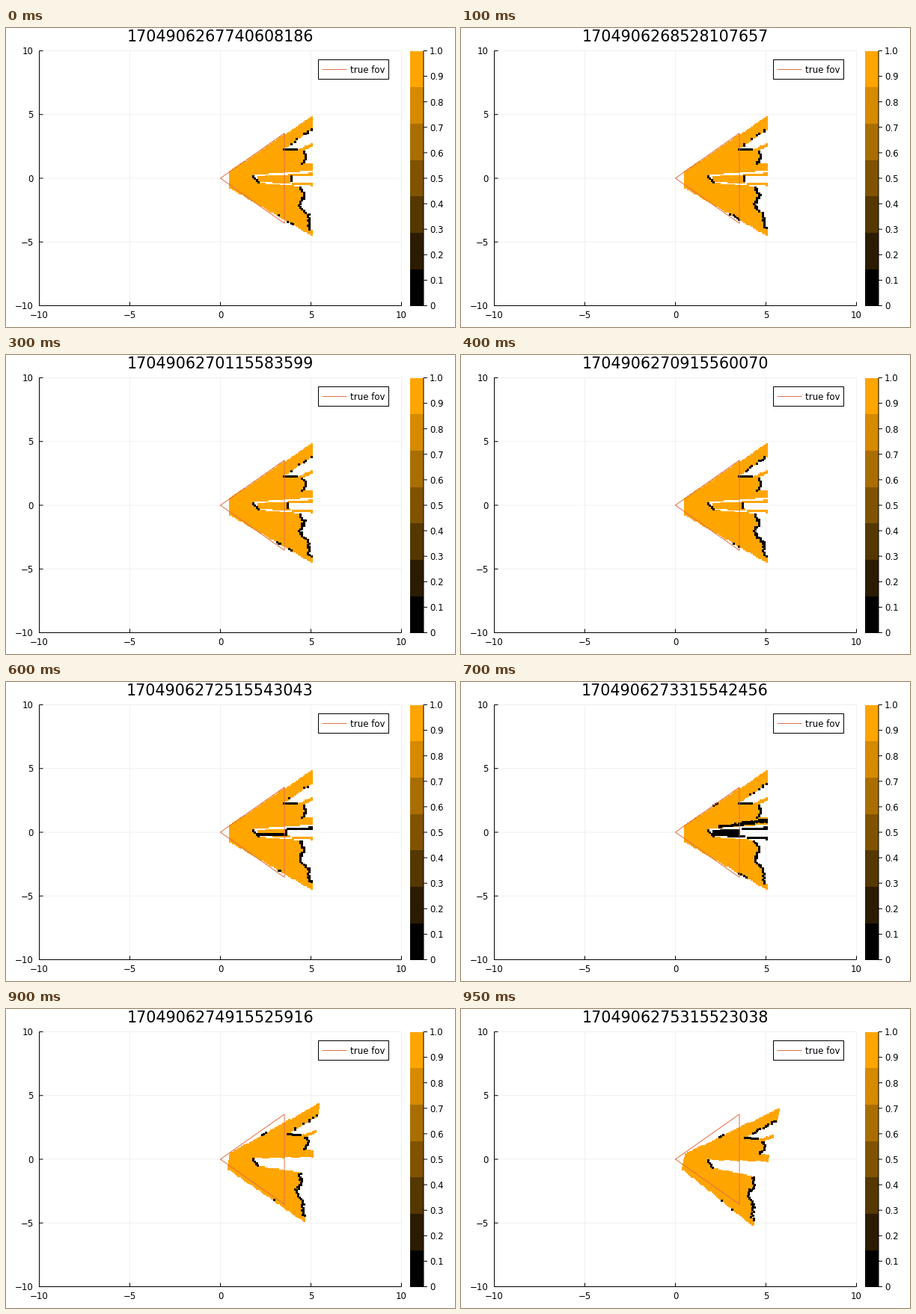
A matplotlib script that plays this animation: 600 px wide and 400 px high, repeating every 1 s.

```python
import numpy as np
import matplotlib.pyplot as plt
from matplotlib.animation import FuncAnimation
from matplotlib.patches import Rectangle

W, H, DPI = 600, 400, 100
FRAMES, INTERVAL = 20, 50
ORANGE, BLACK, FOV, GRID = "#ffa500", "#000000", "#e26f46", "#f0f0f0"
LEFT, RIGHT, TOP, BOTTOM = 44.5, 528.5, 30.5, 371.5
PT = 72 / DPI
CELL = 0.1

# Clock readings (ns) at key steps; the rest are interpolated
STAMPS = {
    0: 1704906267740608186, 4: 1704906269315607128,
    8: 1704906270915560070, 12: 1704906272515543043,
    14: 1704906273315542456, 16: 1704906274115531672,
    19: 1704906275315523038,
}

plt.rcParams["font.family"] = "DejaVu Sans"
fig = plt.figure(figsize=(W / DPI, H / DPI), dpi=DPI, facecolor="white")
ax = fig.add_axes([0, 0, 1, 1])
ax.set(xlim=(0, W), ylim=(H, 0))
ax.axis("off")


def px(x, y):
    return (LEFT + (x + 10) * (RIGHT - LEFT) / 20,
            BOTTOM - (y + 10) * (BOTTOM - TOP) / 20)


def line(xs, ys, color=BLACK, z=3):
    ax.plot(xs, ys, color=color, lw=PT, zorder=z, snap=False,
            solid_capstyle="butt", solid_joinstyle="miter")


def label(x, y, text, ha="center", size=8.45):
    return ax.text(x, y, text, ha=ha, va="center_baseline", fontsize=size,
                   zorder=6)


def draw_axes():
    for v in range(-10, 11, 5):
        x, y = px(v, v)
        line([x, x], [TOP, BOTTOM], GRID, z=0)
        line([LEFT, RIGHT], [y, y], GRID, z=0)
        line([x, x], [BOTTOM, BOTTOM - 5])
        line([LEFT, LEFT + 5], [y, y])
        name = str(v).replace("-", "\u2212")
        label(x, 382.6, name)
        label(36.8, y - 0.4, name, "right")
    line([LEFT, LEFT, RIGHT], [TOP, BOTTOM, BOTTOM])


def draw_colorbar():
    step = (BOTTOM - TOP) / 7
    for i in range(7):
        shade = (i / 6, i / 6 * 165 / 255, 0)
        ax.add_patch(Rectangle((540, BOTTOM - (i + 1) * step), 18, step,
                               fc=shade, lw=0, antialiased=False))
    line([558, 558], [TOP, BOTTOM])
    for i in range(11):
        y = BOTTOM - i * (BOTTOM - TOP) / 10
        line([558, 563], [y, y])
        label(566, y - 0.2, f"{i / 10:.1f}" if i else "0", "left")


def draw_legend():
    ax.add_patch(Rectangle((417.5, 42.5), 94, 26, fc="white", ec=BLACK,
                           lw=PT, zorder=5, snap=False))
    line([422.5, 455.5], [55.5, 55.5], FOV, z=6)
    label(460, 55, "true fov", "left")


def draw_fov():
    r = 5 * np.sqrt(0.5)
    line(*px(np.array([0, r, r, 0]), np.array([0, r, -r, 0])), FOV, z=4)


gx, gy = [g.ravel() for g in np.meshgrid(np.arange(5, 51) * CELL,
                                         np.arange(-49, 52) * CELL)]
row = np.round(gy / CELL).astype(int) + 49


def between(v, low, high):
    return (v >= low) & (v <= high)


def wedge(low, high, start, end=5.1):
    """Cells between two rays from the sensor."""
    return between(gy / gx, low, high) & between(gx, start, end)


def on(v, target):
    return np.abs(v - target) < 0.55 * CELL


def scan(k):
    """Masks of free and blocked cells for step k."""
    rng = np.random.default_rng(k + 3)
    noise = rng.uniform(-0.07, 0.07, row.max() + 1)[row]
    chance = rng.random(len(gx))

    # Field of view
    upper, lower = 0.955 * gx + 0.06, -0.83 * gx - 0.29
    free = between(gy, lower, upper)
    blocked = on(gy, lower) & between(gx, 3, 4) & (chance < 0.3)
    if k >= 14:
        blocked |= on(gy, upper) & between(gx, 2.1, 2.4)

    # Gap below the upper arm
    shelf = 2.25 + 0.68 * np.maximum(gx - 4.3, 0)
    arm = gx - 1.15
    free &= ~((gx > 3.5) & between(gy, shelf, arm))
    blocked |= on(gy, 2.3) & between(gx, 3.5, 4.2)
    blocked |= on(gy, arm) & (gx > 3.8) & (chance < 0.3)

    # Obstacles on the right
    bay = between(gy, 1.15, shelf - 0.2)
    bay_wall = 4.4 + 0.3 * np.sin(np.pi * (gy - 1.05) / 1.3) + noise / 2
    side = between(gy, -4, -0.13 * gx - 0.05)
    side_wall = (4.5 - 0.11 * np.cos(4.3 * (gy + 0.62)) + noise
                 + 0.45 * np.clip(-2.4 - gy, 0, 1))
    for zone, wall in ((bay, bay_wall), (side, side_wall)):
        free &= ~(zone & (gx > wall))
        blocked |= zone & on(gx, wall)

    # Shadow behind the near obstacle
    front = 1.9 - 0.6 * gy
    free &= ~((gx > front) & between(gy, -0.13 * gx - 0.08,
                                     0.12 * gx + 0.08))
    blocked |= on(gx, front) & between(gy, -0.35, 0.25)

    # Stray rays crossing the shadow, which turn blocked later on
    if k < 18:
        end = 3.57 + 0.3 * max(0, 1 - k / 13) ** 1.3
        core = wedge(-0.105, 0.08, 2.05, end)
        high = wedge(0.06, 0.082, end)
        low = wedge(-0.1, -0.078, end)
        free |= high | low
        if k < 16:
            free |= core
        if k < 14:
            blocked |= on(gx, end) & between(gy, -0.25, 0.25)
        if k >= 12:
            blocked |= high
            blocked |= core & between(gy, *((-0.25, -0.05) if k < 14 else
                                            (-1, 1) if k < 16 else
                                            (-0.05, 0.15)))
        if k >= 14:
            blocked |= low | (wedge(0.16, 0.22, 2.4) & (chance < 0.85))
        if k >= 16:
            blocked |= wedge(-0.105, -0.085, 2.4, end)
    return free & ~blocked, blocked


def stamp(k):
    a = max(s for s in STAMPS if s <= k)
    b = min(s for s in STAMPS if s >= k)
    return STAMPS[a] + (STAMPS[b] - STAMPS[a]) * (k - a) // max(b - a, 1)


def cloud(color, z):
    return ax.scatter([], [], s=(3 * PT) ** 2, marker="s", c=color, lw=0,
                      zorder=z)


draw_axes()
draw_colorbar()
draw_legend()
draw_fov()
title = label(286, 10.4, "", size=14.88)
free_cloud, blocked_cloud = cloud(ORANGE, 1), cloud(BLACK, 2)


def update(k):
    n = max(0, k - 16)
    turn = -np.radians(n * (n + 3) / 2)
    c, s = np.cos(turn), np.sin(turn)
    spots = np.column_stack(px(c * gx - s * gy, s * gx + c * gy))
    for dots, mask in zip((free_cloud, blocked_cloud), scan(k)):
        dots.set_offsets(spots[mask])
    title.set_text(str(stamp(k)))
    return free_cloud, blocked_cloud, title


anim = FuncAnimation(fig, update, frames=FRAMES, interval=INTERVAL,
                     repeat=True, repeat_delay=0)
plt.show()
```
